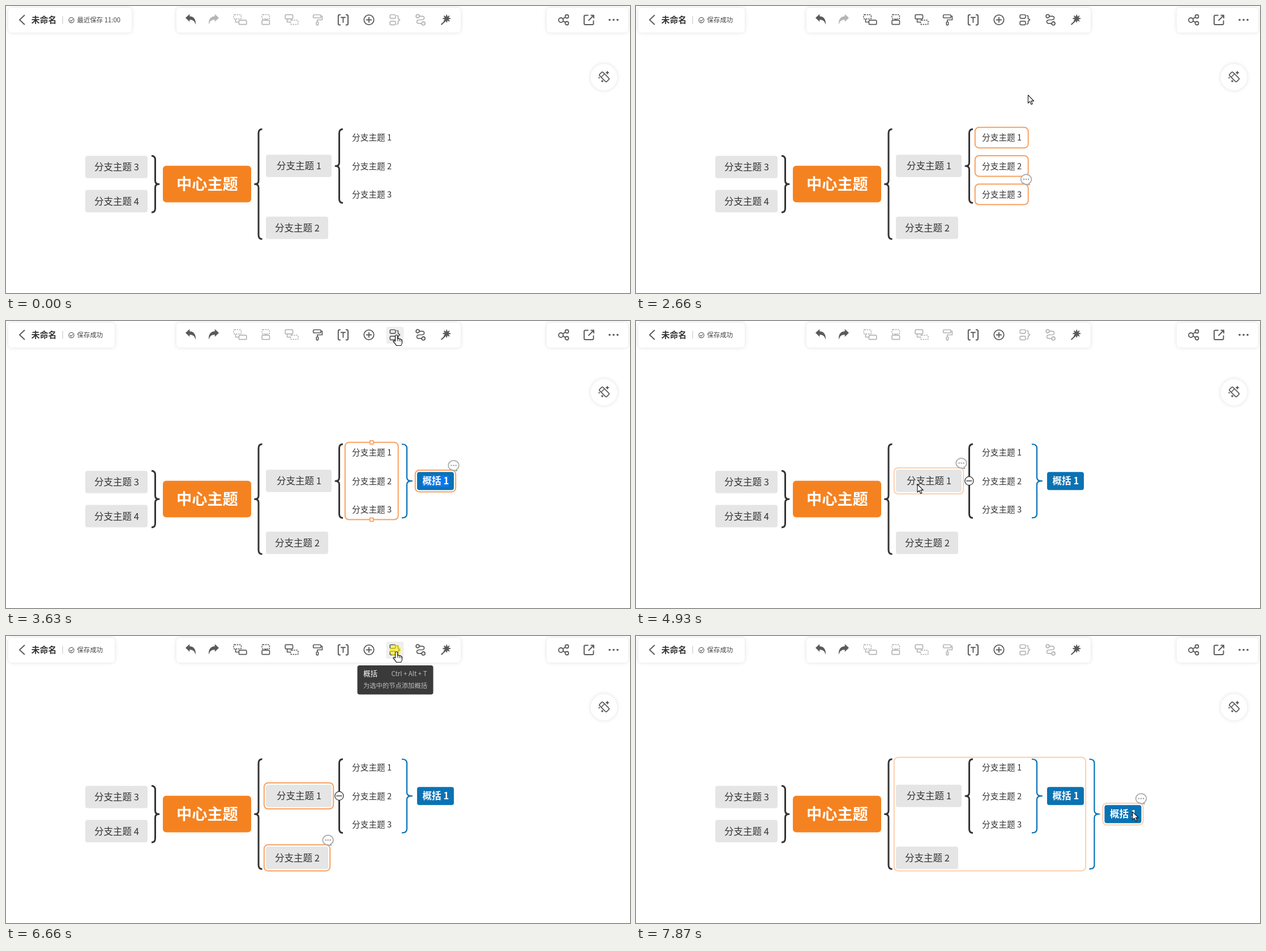
An HTML page with a canvas that plays this animation: 1102 by 508 pixels, repeating every 8000 ms.

```html
<!DOCTYPE html>
<html lang="zh-CN">
<head>
<meta charset="utf-8">
<title>思维导图</title>
<style>
html, body { margin: 0; width: 100%; height: 100%; overflow: hidden; background: #fff; }
canvas { display: block; width: 1102px; height: 508px; }
</style>
</head>
<body>
<canvas id="stage"></canvas>
<script>
const W = 1102, H = 508, LOOP = 8000;
const canvas = document.getElementById('stage');
const c = canvas.getContext('2d');
const dpr = window.devicePixelRatio || 1;
canvas.width = W * dpr;
canvas.height = H * dpr;

const FONT = '"Noto Sans CJK SC", "Noto Sans CJK", "Noto Sans", sans-serif';
const INK = '#333', ICON = '#5a5a5a', MUTED = '#b5b5b5';
const BLUE = '#0b72b3', STRONG = '#f9a05f', PALE = '#fdcfae';
const PAD = 3.2, BAR_Y = 24.5;

// ---- Layout: nodes are boxes given by their centre ----
const node = (label, x, y, w, h, style) =>
  ({ label, x, y, left: x - w / 2, right: x + w / 2, top: y - h / 2, bottom: y + h / 2, ...style });

const BRANCH = { size: 16.5, weight: 300, color: INK, fill: '#e5e5e5', radius: 4 };
const TOPIC = { size: 14.65, weight: 300, color: INK };
const SUMMARY = { size: 16.6, weight: 700, color: '#fff', fill: BLUE, radius: 4 };

const root = node('中心主题', 355, 315.2, 156, 64.8,
  { size: 27.2, weight: 700, color: '#fff', fill: '#f58220', radius: 6 });
const topics = [1, 2, 3].map(i => node('分支主题 ' + i, 645.7, 182.8 + 50.2 * i, 87.5, 30, TOPIC));
const right = [
  node('分支主题 1', 517, 283, 116, 39.7, BRANCH),
  node('分支主题 2', 514, 392.6, 110, 39.7, BRANCH)
];
const left = [3, 4].map(i => node('分支主题 ' + i, 195, 103.8 + 60.4 * i, 110, 39.7, BRANCH));
right[0].parent = true;

function bounds(nodes) {
  const pick = (f, k) => f(...nodes.map(n => n[k]));
  return {
    left: pick(Math.min, 'left'), right: pick(Math.max, 'right'),
    top: pick(Math.min, 'top'), bottom: pick(Math.max, 'bottom')
  };
}

function summarize(nodes) {
  const range = bounds(nodes);
  return { ...node('概括 1', range.right + 69, (range.top + range.bottom) / 2, 65, 32, SUMMARY), range };
}
const inner = summarize(topics);
const outer = summarize([...right, ...topics, inner]);

const toolX = i => i < 2 ? 326.5 + 40 * i : 413.2 + 45.55 * (i - 2);
const SUM_TOOL = 8;
const tool = { x: toolX(SUM_TOOL), y: BAR_Y };
const spot = (x, y) => ({ x, y });

// ---- Script: move from start to end, offset from the goal, click ----
const STEPS = [
  { start: 70, end: 810, goal: topics[0], dx: 4, click: 950 },
  { start: 1080, end: 1350, goal: topics[1], dx: 4, click: 1690 },
  { start: 1700, end: 1960, goal: topics[2], dx: 4, click: 2100 },
  { start: 2200, end: 2480, goal: spot(693, 185) },
  { start: 2620, end: 3070, goal: tool, dx: 3, click: 3630, adds: inner },
  { start: 3720, end: 4170, goal: spot(823, 296), click: 4380 },
  { start: 4600, end: 4930, goal: right[0], dx: -20, dy: 6, click: 5070 },
  { start: 5270, end: 5550, goal: right[1], dx: -13, dy: -7, click: 5620 },
  { start: 5740, end: 6350, goal: tool, dx: 3, dy: 3, click: 6740, adds: outer },
  { start: 6850, end: 7250, goal: spot(922, 312), click: 7310 },
  { start: 7680, end: 7860, goal: outer, dx: 17, dy: -4 }
];
const ENTRY = spot(1060, 508);
const aim = s => spot(s.goal.x + (s.dx || 0), s.goal.y + (s.dy || 0));

function pointerAt(t) {
  const i = STEPS.findLastIndex(s => s.start <= t);
  if (i < 0) return null;
  const s = STEPS[i], a = i ? aim(STEPS[i - 1]) : ENTRY, b = aim(s);
  const k = 1 - (1 - Math.min(1, (t - s.start) / (s.end - s.start))) ** 2;
  return spot(a.x + (b.x - a.x) * k, a.y + (b.y - a.y) * k);
}

// Everything on stage follows from the pointer and the clicks so far
function stateAt(t) {
  let selected = [];
  const summaries = [];
  for (const { click, goal, adds } of STEPS) {
    if (!(click <= t)) continue;
    if (adds) summaries.push(adds);
    if (adds) selected = [adds];
    else selected = goal.label ? [...selected, goal] : [];
  }
  const p = pointerAt(t), reach = 7;
  const hit = n => p && p.x > n.left - reach && p.x < n.right + reach &&
    p.y > n.top - reach && p.y < n.bottom + reach;
  return {
    selected, summaries, pointer: p,
    over: [...right, ...topics, ...summaries].find(hit),
    onTool: p && Math.abs(p.x - tool.x) < 16 && Math.abs(p.y - tool.y) < 16,
    saved: t >= STEPS[0].click,
    pressing: STEPS.some(s => t >= s.click - 110 && t < s.click),
    tip: STEPS.some(s => s.adds && t >= s.end + 120 && t < s.click)
  };
}

// ---- Drawing helpers ----
function text(s, x, y, size, color, weight = 400, align = 'left') {
  c.font = `${weight} ${size}px ${FONT}`;
  c.textAlign = align;
  c.fillStyle = color;
  c.fillText(s, x, y + size * 0.375);
}

function rect(x, y, w, h, r, fill) {
  c.beginPath();
  c.roundRect(x, y, w, h, r);
  if (fill) { c.fillStyle = fill; c.fill(); }
}

function line(d, width = 1.8) {
  c.lineWidth = width;
  c.stroke(new Path2D(d));
}

function arc(x, y, r, width) {
  c.beginPath();
  c.arc(x, y, r, 0, 7);
  if (!width) return c.fill();
  c.lineWidth = width;
  c.stroke();
}

function frame(x, y, w, h, dashed) {
  c.setLineDash(dashed ? [2.4, 1.6] : []);
  c.lineWidth = 1.7;
  rect(x, y, w, h, 1.8);
  c.stroke();
  c.setLineDash([]);
}

function card(x, y, w, h, r) {
  c.save();
  c.shadowColor = 'rgba(0,0,0,.13)';
  c.shadowBlur = 7 * dpr;
  rect(x, y, w, h, r, '#fff');
  c.restore();
}

function at(x, y, draw) {
  c.save();
  c.translate(x, y);
  draw();
  c.restore();
}

// ---- Mind map ----
function brace(x, w, { top, bottom }, color, width) {
  const mid = (top + bottom) / 2, spine = x + w / 2;
  c.strokeStyle = color;
  line(`M${x} ${top}Q${spine} ${top} ${spine} ${top + 7}V${mid - 6}Q${spine} ${mid} ${x + w} ${mid}` +
    `Q${spine} ${mid} ${spine} ${mid + 6}V${bottom - 7}Q${spine} ${bottom} ${x} ${bottom}`, width);
}

function drawNode(n, editing) {
  if (n.fill) rect(n.left, n.top, n.right - n.left, n.bottom - n.top, n.radius, n.fill);
  if (editing) rect(n.left + 9, n.top + 6, n.right - n.left - 18, 20, 0, '#0a78f0');
  text(n.label, n.x + 0.4, n.y, n.size, n.color, n.weight, 'center');
}

function outline(n, color) {
  rect(n.left - PAD, n.top - PAD, n.right - n.left + 2 * PAD, n.bottom - n.top + 2 * PAD, 7);
  c.strokeStyle = color;
  c.lineWidth = 2;
  c.stroke();
}

function grips({ left, right, top, bottom }) {
  c.fillStyle = '#fff';
  c.strokeStyle = STRONG;
  c.lineWidth = 1.8;
  for (const y of [top - PAD, bottom + PAD]) {
    rect((left + right) / 2 - 3, y - 3, 6, 6, 0, '#fff');
    c.stroke();
  }
}

function bubble(n) {
  at(n.right - 0.4, n.top - 11.6, () => {
    c.fillStyle = '#fff';
    c.strokeStyle = '#a6a6a6';
    c.lineWidth = 1.7;
    c.beginPath();
    c.ellipse(0, 0, 9.4, 8.6, 0, 0.55 * Math.PI, 2.35 * Math.PI);
    c.lineTo(6, 9.5);
    c.closePath();
    c.fill();
    c.stroke();
    c.fillStyle = '#999';
    for (const d of [-4, 0, 4]) arc(d, 0, 1.2);
  });
}

function collapse(n) {
  at(n.right + 13.4, n.y, () => {
    c.fillStyle = '#fff';
    c.strokeStyle = INK;
    arc(0, 0, 8);
    arc(0, 0, 7.6, 1.3);
    line('M-5 0H5', 1.4);
  });
}

function drawMap({ selected, summaries, over }) {
  brace(257, 13, bounds(left), INK, 3);
  brace(452.5, -13, bounds([...right, ...topics]), INK, 3);
  brace(595, -13, bounds(topics), INK, 3);
  for (const n of [root, ...left, ...right, ...topics]) drawNode(n);
  for (const s of summaries) {
    brace(s.range.right + 9.5, 18, s.range, BLUE, 2.2);
    drawNode(s, selected.includes(s));
  }

  const last = selected[selected.length - 1];
  const marked = [...new Set([...selected, over])].filter(Boolean);
  for (const n of marked) {
    const chosen = selected.includes(n), color = chosen ? STRONG : PALE;
    outline(n, color);
    if (n.range) outline(n.range, color);
    if (n.range && chosen) grips(n.range);
    if (n.parent) collapse(n);
  }
  for (const n of marked) if (over || n === last) bubble(n);
}

// ---- Toolbar: icons are drawn around their own centre ----
const BACK = new Path2D('M-9.5 -3.5L-2.2 -10.3V-6.2C5 -6 9.2 -1 8.4 8.6C6.5 2.5 4 -.2 -2.2 -.2V3.6Z');

function insert(x1, x2, dashedFirst, link) {
  frame(x1, -9.2, 13.4, 7.6, dashedFirst);
  frame(x2, 0.6, 13.4, 7.6, !dashedFirst);
  line(link, 1.7);
}

function burst() {
  line('M-9 8.5L-1 1', 2);
  arc(0.6, -2.3, 4.2);
  for (let a = 0; a < 2 * Math.PI; a += Math.PI / 4) {
    c.beginPath();
    c.moveTo(0.6, -2.3);
    c.lineTo(0.6 + 6.8 * Math.cos(a), -2.3 + 6.8 * Math.sin(a));
    c.stroke();
  }
}

const ICONS = [
  () => c.fill(BACK),
  () => { c.scale(-1, 1); c.fill(BACK); },
  () => insert(-11.2, -1.8, true, 'M-7.7 -1.5V4H-1.8'),
  () => insert(-6.7, -6.7, true, 'M0 -1.5V.5'),
  () => insert(-11.2, -1.8, false, 'M-7.7 -1.5V4H-1.8'),
  () => { frame(-7.2, -9, 13.5, 5.5); line('M6.5 -6.5H8.6V0H0V3.5', 1.7); frame(-1.7, 3.5, 3.4, 5.8); },
  () => {
    for (const s of [-1, 1]) line(`M${4.5 * s} -9H${6.5 * s}Q${8.6 * s} -9 ${8.6 * s} -6.5V6.5Q${8.6 * s} 9 ${6.5 * s} 9H${4.5 * s}`, 2);
    line('M-4.3 -4.3H4.3M0 -4.3V5.3', 1.9);
  },
  () => { arc(0, 0, 8.7, 1.8); line('M-5 0H5M0 -5V5'); },
  () => {
    for (const y of [-9, 2.4]) frame(-8.3, y, 9.6, 6.4);
    line('M3 -7.5H4.5Q6 -7.5 6 -6V-2.5L9 0L6 2.5V6Q6 7.5 4.5 7.5H3', 1.7);
  },
  () => {
    for (const s of [-1, 1]) arc(5 * s, 6.4 * s, 2.9, 1.8);
    line('M-2 -6.4H3Q6.5 -6.4 6.5 -3.3Q6.5 0 2 0H-2Q-6.5 0 -6.5 3.3Q-6.5 6.4 -3 6.4H2', 1.7);
  },
  burst
];

function toolbar({ selected, summaries, onTool }) {
  card(301, 3, 502, 44, 6);
  if (onTool) rect(tool.x - 15, 10, 31, 30, 3, '#efefef');
  const any = selected.length > 0;
  const plain = any && !selected[0].range;
  const enabled = i => i === 1 ? summaries.length > 0
    : i >= 2 && i <= 4 ? plain
    : [5, 8, 9].includes(i) ? any : true;
  ICONS.forEach((draw, i) => {
    c.fillStyle = c.strokeStyle = enabled(i) ? ICON : MUTED;
    at(toolX(i), BAR_Y, draw);
  });
}

function header({ saved }) {
  card(4, 3, saved ? 188 : 218, 44, 6);
  c.strokeStyle = ICON;
  line('M33 16L24 24.5L33 33', 1.9);
  text('未命名', 44.8, BAR_Y, 14.9, INK, 700);
  c.strokeStyle = '#ccc';
  line('M100 17.5V31.5', 1.2);
  c.strokeStyle = '#555';
  arc(115.5, 25, 4.6, 1.1);
  line('M113 25L115 27L118.3 23.3', 1.1);
  text(saved ? '保存成功' : '最近保存 11:00', 125.6, 24.8, 11.4, '#444');
}

function star(x, y, r) {
  const d = r * 0.35;
  at(x, y, () => c.fill(new Path2D(
    `M0 ${-r}L${d} ${-d}L${r} 0L${d} ${d}L0 ${r}L${-d} ${d}L${-r} 0L${-d} ${-d}Z`)));
}

function actions() {
  card(955, 3, 144, 44, 6);
  c.strokeStyle = c.fillStyle = ICON;
  at(985, BAR_Y, () => {
    arc(-5, 0.5, 4, 1.8);
    for (const s of [-1, 1]) {
      arc(5.5, 6 * s, 3, 1.8);
      line(`M-1.5 ${2 * s}L3 ${4.6 * s}`);
    }
  });
  at(1029.5, BAR_Y, () =>
    line('M-1 -8H-6.5Q-8.5 -8 -8.5 -6V6.5Q-8.5 8.5 -6.5 8.5H6Q8 8.5 8 6.5V1M3 -8H8.5V-2.5M8.5 -8L-1 1.5', 1.9));
  for (const d of [-7, 0, 7]) arc(1073 + d, BAR_Y, 1.8);

  card(1032.5, 102.5, 47, 47, 23.5);
  at(1056.5, 125.5, () => {
    c.rotate(-Math.PI / 4);
    frame(-4.2, -9, 8.4, 18);
    line('M-4.2 -3.5H4.2', 1.6);
  });
  star(1062, 118, 3.6);
  star(1053, 133, 2.6);
  star(1047.5, 127, 1.8);
}

function tooltip() {
  rect(620.5, 52, 134, 51.5, 4, '#3a3a3a');
  text('概括', 631, 66.5, 12.6, '#fff', 500);
  text('Ctrl + Alt + T', 743.5, 66.5, 11.4, '#bdbdbd', 400, 'right');
  text('为选中的节点添加概括', 631, 88, 11.3, '#bdbdbd');
}

const ARROW = new Path2D('M0 0V14.2L3.3 11.2L5.6 16.4L7.8 15.4L5.6 10.4H10.2Z');
const HAND = new Path2D('M-2 1.5Q0 -1 2 1.5V7Q4 5.5 5 7.5Q7 6.3 7.7 8.4Q10 8 10 10.5V14Q9.6 16.5 8 19H0Q-2 15.5 -5.5 12Q-6 9 -2 11.5Z');

function drawPointer({ pointer, pressing, onTool }) {
  if (!pointer) return;
  at(pointer.x, pointer.y, () => {
    if (pressing) {
      c.fillStyle = 'rgba(255,240,0,.6)';
      arc(onTool ? -2 : 0, onTool ? -2 : 0, 10);
    }
    const shape = onTool ? HAND : ARROW;
    c.fillStyle = '#fff';
    c.strokeStyle = '#111';
    c.lineWidth = 1.1;
    c.fill(shape);
    c.stroke(shape);
    if (onTool) line('M2 7V11M5 8V11.5M7.7 9V12', 0.9);
  });
}

function render(t) {
  const state = stateAt(t);
  c.setTransform(dpr, 0, 0, dpr, 0, 0);
  c.fillStyle = '#fff';
  c.fillRect(0, 0, W, H);
  c.lineJoin = 'round';
  header(state);
  toolbar(state);
  actions();
  drawMap(state);
  if (state.tip) tooltip();
  drawPointer(state);
}

let start;
function tick(now) {
  start ??= now;
  render(Math.max(0, now - start) % LOOP);
  requestAnimationFrame(tick);
}
requestAnimationFrame(tick);
</script>
</body>
</html>
```
